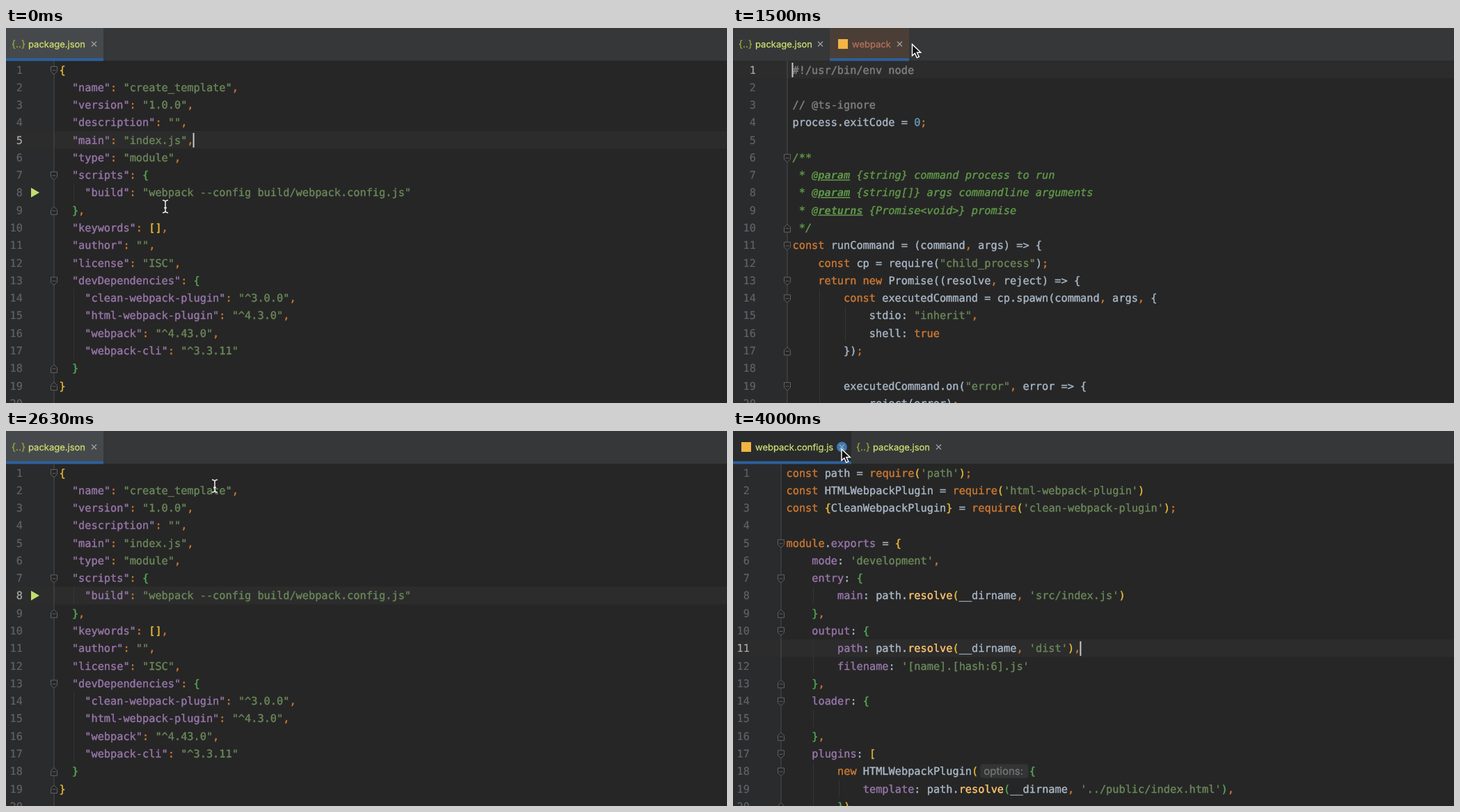
These frames come from a looping animation (1036x540 px, 4.12 s). An HTML page:

```html
<!DOCTYPE html>
<html lang="en">
<head>
<meta charset="utf-8">
<title>Code editor</title>
<style>
html, body { margin: 0; width: 100%; height: 100%; overflow: hidden; background: #262626; }
svg { display: block; width: 1036px; height: 540px; }
text, tspan { fill: currentColor; stroke: currentColor; }
text { white-space: pre; text-rendering: geometricPrecision; color: #a9b7c6; stroke-width: .4;
  font: 15.27px "DejaVu Sans Mono", "Noto Sans Mono", monospace; }
.ui { font: 13px Inter, "Open Sans", sans-serif; stroke-width: .25; }
.hint { font-size: 15px; color: #787878; }
.num { color: #606366; text-anchor: end; stroke-width: .2; }
.num.now { color: #a9abad; }
.p { color: #9876aa; } .o { color: #cc7832; } .g { color: #6a8759; } .y { color: #e8ba36; }
.b { color: #54a857; } .n { color: #6897bb; } .c { color: #808080; } .f { color: #ffc66d; }
.d { color: #60994a; font-style: italic; }
.t { color: #60994a; font-style: italic; font-weight: bold; text-decoration: underline; stroke-width: 0; }
.l { color: #469ff0; text-decoration: underline; }
.fold { fill: #262626; stroke: #606264; }
.x { stroke: #a0a3a6; stroke-width: 1.2; }
</style>
</head>
<body>
<svg id="stage" viewBox="0 0 1036 540"></svg>
<script>
const LOOP = 4120, STEP = 125, CHAR = 9.193, BAR = 47;
const stage = document.getElementById("stage");

// "§x" switches the text to class x until the next switch; "§w" is plain.
const pages = {
  package: {
    gutter: 69, opens: [1, 7, 13], closes: [9, 18, 19], run: 8,
    guides: [[2, 8, 8], [2, 14, 17]],
    tabs: [{ x: 0, end: 140, label: "package.json", ink: "#cfdf70", active: "#46494c" }],
    code: `§y{
  §p"name"§o: §g"create_template"§o,
  §p"version"§o: §g"1.0.0"§o,
  §p"description"§o: §g""§o,
  §p"main"§o: §g"index.js"§o,
  §p"type"§o: §g"module"§o,
  §p"scripts"§o: §b{
    §p"build"§o: §g"webpack --config build/webpack.config.js"
  §b}§o,
  §p"keywords"§o: §y[]§o,
  §p"author"§o: §g""§o,
  §p"license"§o: §g"ISC"§o,
  §p"devDependencies"§o: §b{
    §p"clean-webpack-plugin"§o: §g"^3.0.0"§o,
    §p"html-webpack-plugin"§o: §g"^4.3.0"§o,
    §p"webpack"§o: §g"^4.43.0"§o,
    §p"webpack-cli"§o: §g"^3.3.11"
  §b}
§y}
`
  },
  script: {
    gutter: 78, opens: [6, 11, 13, 14, 19], closes: [10, 17],
    guides: [[4, 14, 20], [8, 15, 16]],
    tabs: [
      { x: 0, end: 139, label: "package.json", ink: "#cfdf70" },
      { x: 139, end: 253, label: "webpack", ink: "#b5735c", js: true, active: "#4a3e36" }
    ],
    code: `§c#!/usr/bin/env node

§c// @ts-ignore
process.exitCode = §n0§o;

§d/**
§d * §t@param§d {string} command process to run
§d * §t@param§d {string[]} args commandline arguments
§d * §t@returns§d {Promise&lt;void>} promise
§d */
§oconst §wrunCommand = (command§o, §wargs) => {
    §oconst §wcp = require(§g"child_process"§w)§o;
    §oreturn new §wPromise((resolve§o, §wreject) => {
        §oconst §wexecutedCommand = cp.spawn(command§o, §wargs§o, §w{
            stdio: §g"inherit"§o,
            §wshell: §otrue
        §w})§o;

        §wexecutedCommand.on(§g"error"§o, §werror => {
            reject(error)§o;`
  },
  config: {
    gutter: 69, opens: [5, 7, 10, 14, 17, 18], closes: [9, 13, 16, 20],
    guides: [[4, 8, 8], [4, 11, 12], [4, 15, 15], [4, 18, 20], [8, 19, 19]],
    hint: { row: 18, col: 30, label: "options:" },
    tabs: [
      { x: 0, end: 170, label: "webpack.config.js", ink: "#cfdf70", js: true, active: "#46494c" },
      { x: 169, end: 309, label: "package.json", ink: "#cfdf70" }
    ],
    code: `§oconst §wpath = §orequire§y(§g'path'§y)§o;
§oconst §wHTMLWebpackPlugin = §orequire§y(§g'html-webpack-plugin'§y)
§oconst §y{§wCleanWebpackPlugin§y} §w= §orequire§y(§g'clean-webpack-plugin'§y)§o;

§omodule§w.§pexports §w= §y{
    §pmode§w: §g'development'§o,
    §pentry§w: §b{
        §pmain§w: path.§fresolve§y(§w__dirname§o, §g'src/index.js'§y)
    §b}§o,
    §poutput§w: §b{
        §ppath§w: path.§fresolve§y(§w__dirname§o, §g'dist'§y)§o,
        §pfilename§w: §g'[name].[hash:6].js'
    §b}§o,
    §ploader§w: §b{

    §b}§o,
    §pplugins§w: §y[
        §onew §wHTMLWebpackPlugin§y(        §b{
            §ptemplate§w: path.§fresolve§b(§w__dirname§o, §g'../public/index.html'§b)§o,
        §b}§y)`
  }
};

// Pointer path: [step, x, y]
const path = [
  [0, 229, 257], [3, 231, 250], [4, 233, 240], [6, 234, 240], [9, 234, 240], [12, 257.5, 23.5],
  [14, 239, 24], [20, 239, 24], [23, 474, 237], [27, 474, 237], [29, 307, 2], [32, 156, 26]
];

const rowY = row => 60 + 25.28 * (row - 1);
const within = (k, a, b) => k >= a && k <= b;
const rect = (x, y, w, h, fill, more = "") =>
  `<rect x="${x}" y="${y}" width="${w}" height="${h}" fill="${fill}" ${more}/>`;

function pointerAt(k) {
  const i = Math.max(1, path.findIndex(p => p[0] >= k));
  const [a, x, y] = path[i - 1], [b, x2, y2] = path[i];
  const u = (k - a) / (b - a), e = u * u * (3 - 2 * u);
  return { x: x + (x2 - x) * e, y: y + (y2 - y) * e };
}

function stateAt(k) {
  const page = k < 6 || within(k, 16, 25) ? "package" : k < 16 ? "script" : "config";
  let caret = [8, 17];
  if (k < 5) caret = [5, 21];
  else if (page == "script") caret = [1, 0];
  else if (page == "config") caret = [11, 46];
  else if (k == 25) caret = [8, 43];
  const hidden = within(k, 6, 9) || within(k, 14, 15) || within(k, 20, 23);
  const link = within(k, 4, 5) ? "webpack" : within(k, 23, 25) ? "webpack.config.js" : "";
  const pointer = pointerAt(k);
  const arrow = pointer.y < BAR || k > 25 || within(k, 6, 8);
  return { page, caret, hidden, link, pointer, shape: link ? "hand" : arrow ? "arrow" : "beam" };
}

function tabBar(tabs, { x, y }) {
  return rect(0, 0, 1036, BAR, "#353739") + tabs.map(t => {
    const close = t.end - 13.5;
    const hover = y < BAR && x >= t.x && x < t.end;
    const hot = hover && Math.abs(x - close) < 8;
    const fill = hover ? "#292b2d" : t.active || "none";
    const icon = t.js
      ? rect(t.x + 12, 16, 14, 14, "#f2b444")
      : `<text class="ui" x="${t.x + 18}" y="27.5" text-anchor="middle" style="color:#98a83c;font-size:14px">{..}</text>`;
    return rect(t.x, 0, t.end - t.x, BAR, fill)
      + (t.active ? rect(t.x, 43.5, t.end - t.x, 4, "#2d609c") : "") + icon
      + `<text class="ui" x="${t.x + 32}" y="27.5" style="color:${t.ink}">${t.label}</text>`
      + (hot ? `<circle cx="${close}" cy="23" r="7.5" fill="#3c78b5"/>` : "")
      + `<path class="x" d="M${close - 3.5} 19.5l7 7m0-7l-7 7"/>`;
  }).join("");
}

function codeLine(line, row, x) {
  const parts = line.split(/§(.)/);
  let out = parts[0];
  for (let i = 1; i < parts.length; i += 2) out += `<tspan class="${parts[i]}">${parts[i + 1]}</tspan>`;
  return `<text x="${x}" y="${rowY(row) + 5.5}">${out}</text>`;
}

function foldMark(x, row, flip) {
  return `<path class="fold" transform="translate(${x} ${rowY(row) + 1}) scale(1 ${flip})"
    d="M-4.5-5.5h9v7l-4.5 4.5l-4.5-4.5zM-2.5 0h5"/>`;
}

function editor(page, { caret: [row, col], hidden, link }, showGuides) {
  const { gutter, code, guides, hint, run } = page;
  const left = gutter + 7.5, colX = c => left + c * CHAR;
  const linked = link.includes(".") ? code.replace("build/" + link, `build/§l${link}§g`)
    : link ? code.replace(`"${link} --`, `"§l${link}§g --`) : code;
  let out = rect(0, BAR, gutter, 540, "#2a2b2d")
    + rect(0, rowY(row) - 12.6, 1036, 25.3, "#2c2c2c")
    + rect(gutter - .5, BAR, 1, 540, "#4b4d4f");
  if (showGuides) for (const [c, from, to] of guides)
    out += rect(Math.round(colX(c) + 2), rowY(from) - 12.6, 1, (to - from + 1) * 25.28, "#353535");
  linked.split("\n").forEach((line, i) => {
    out += `<text class="num ${i + 1 == row ? "now" : ""}" x="${gutter - 45}" y="${rowY(i + 1) + 5.5}">${i + 1}</text>`
      + codeLine(line, i + 1, left);
  });
  page.opens.forEach(r => out += foldMark(gutter, r, 1));
  page.closes.forEach(r => out += foldMark(gutter, r, -1));
  if (run) out += `<path d="M36 ${rowY(run) - 7}l12 7l-12 7z" fill="#c0de70"/>`;
  if (hint) out += rect(colX(hint.col) + 3, rowY(hint.row) - 10, 69, 20, "#333435", 'rx="4"')
    + `<text class="ui hint" x="${colX(hint.col) + 8}" y="${rowY(hint.row) + 5}">${hint.label}</text>`;
  if (!hidden) out += rect(colX(col) - 1, rowY(row) - 10, 2, 21, "#c8c8c8");
  return out;
}

const shapes = {
  arrow: `<path d="M0 0v16.5l3.9-3.6l2.9 6.4l3-1.3l-2.9-6.2h5.4z" fill="#111" stroke="#fff" stroke-width="1.4"/>`,
  beam: `<path d="M-4-9q4 0 4 3q0-3 4-3M0-6v12M-4 9q4 0 4-3q0 3 4 3M-2 2h4"
    fill="none" stroke="#eee" stroke-width="1.5"/>`,
  hand: `<path d="M-2-2q1.5-2 3 0l1.6 4.5q1.2-1.2 2.4 0q1.3-1 2.4.4q1.8-.8 2.4 1l.6 5q0 2-1.2 3.6v2.5h-7.4
    q-1.6-3.4-4.8-6.4q-.8-2 1.2-1.8l2 1.4zM3.6 8v4M6 8v4M8.3 8v4" fill="#fff" stroke="#111"/>`
};

function draw(k) {
  const s = stateAt(k), page = pages[s.page];
  stage.innerHTML = rect(0, 0, 1036, 540, "#262626")
    + editor(page, s, s.page != "script" || k > 10)
    + tabBar(page.tabs, s.pointer)
    + `<g transform="translate(${s.pointer.x} ${s.pointer.y})">${shapes[s.shape]}</g>`;
}

let shown = -1;
function tick() {
  const k = Math.floor(performance.now() % LOOP / STEP);
  if (k != shown) draw(shown = k);
  requestAnimationFrame(tick);
}
tick();
</script>
</body>
</html>
```
